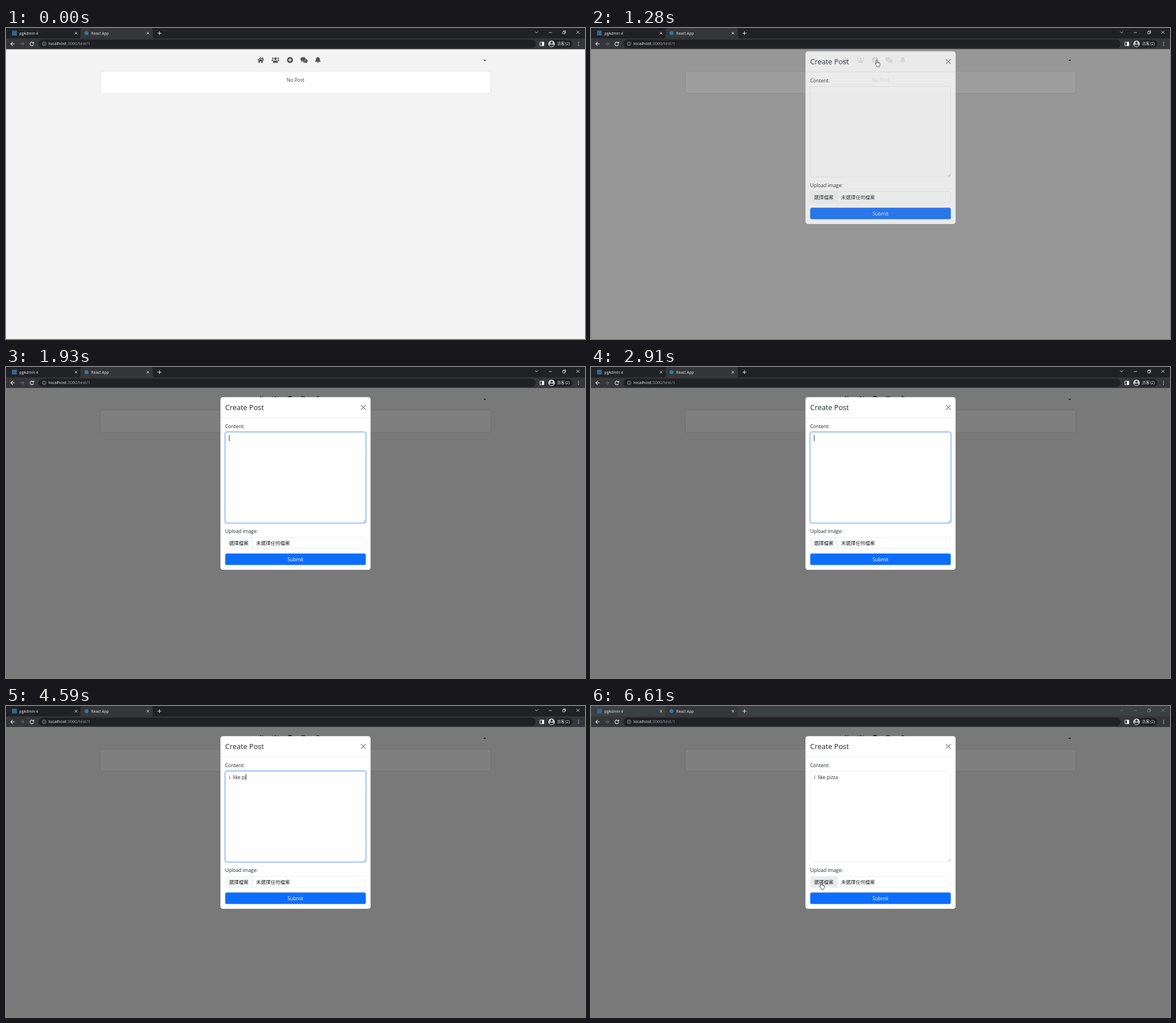
Write an HTML page that moves like this. It is 1021 px wide and 549 px high and loops after 8000 ms.

```html
<!DOCTYPE html>
<html lang="en">
<head>
<meta charset="utf-8">
<title>Create Post</title>
<style>
  html, body { margin: 0; width: 100%; height: 100%; overflow: hidden; background: #f3f3f3; }
  svg { display: block; width: 100%; height: 100%; }
  text { font: 8.51px "Open Sans", "Noto Sans", "Noto Sans CJK TC", "Noto Sans CJK JP", sans-serif; fill: #212529; white-space: pre; }
  .tab { font-size: 6.65px; fill: #e8eaed; }
  .url { font-size: 7.5px; fill: #9aa0a6; }
  .title { font-size: 12.76px; }
  .mid { text-anchor: middle; }
  .line { fill: none; stroke: #e8eaed; stroke-width: 1; }
  .field { fill: #fff; stroke: #dee2e6; stroke-width: .6; }
  .ring { fill: none; stroke: #0d6efd; stroke-opacity: .27; stroke-width: 2.2; }
  .edge { fill: none; stroke: #86b7fe; stroke-width: .7; }
  .cursor { fill: #fff; stroke: #222; stroke-width: .75; stroke-linejoin: round; }
</style>
</head>
<body>
<svg viewBox="0 0 1021 549">
  <!-- page -->
  <rect width="1021" height="549" fill="#f3f3f3"/>
  <g fill="#545454">
    <path d="M443.4 57.1L449 52.3l5.6 4.8" fill="none" stroke="#545454" stroke-width="1.4"/>
    <path d="M452 51.8h1.6v4.6l-1.6-1.4zM445.1 57.5l3.9-3.3 3.9 3.3v4.1h-2.8v-2.7h-2.2v2.7h-2.8z"/>
    <circle cx="475.2" cy="54" r="2.3"/>
    <circle cx="470.4" cy="53.7" r="1.4"/>
    <circle cx="480" cy="53.7" r="1.4"/>
    <path d="M471 61.4v-1.3q0-2.9 2.9-2.9h2.6q2.9 0 2.9 2.9v1.3zM468.3 58.1v-.7q0-1.5 1.5-1.5h1.3l1 .7-1.2 1.5zM482.1 58.1v-.7q0-1.5-1.5-1.5h-1.3l-1 .7 1.2 1.5z"/>
    <circle id="plus" cx="500.8" cy="56.5" r="5.4"/>
    <path d="M500.8 53.4v6.2M497.7 56.5h6.2" stroke="#f3f3f3" stroke-width="1.5"/>
    <path d="M529.8 60.2q.5 1.2 1.7 1.9-2 0-3.4-1z"/>
    <ellipse cx="527.4" cy="57.9" rx="4.5" ry="3.4"/>
    <ellipse cx="523.8" cy="55" rx="4.5" ry="3.4" stroke="#f3f3f3" stroke-width="1.2" paint-order="stroke"/>
    <path d="M520.9 57.3q-.4 1.2-1.5 2 2 0 3.4-1.1z"/>
    <path d="M549.9 51q.7 0 .7.8 2.9.6 2.9 3.8 0 2.3 1.2 3.3v.9h-9.6v-.9q1.2-1 1.2-3.3 0-3.2 2.9-3.8 0-.8.7-.8zM548.5 60.6h2.8q-.2 1.4-1.4 1.4t-1.4-1.4z"/>
  </g>
  <path d="M841.9 56h4.8l-2.4 2.4z" fill="#333"/>
  <rect x="166.3" y="76.3" width="688.5" height="38.8" rx="3" fill="#fff" stroke="#d3d3d3" stroke-width=".6"/>
  <text class="mid" x="510.5" y="94.6" style="fill:#3c4043">No Post</text>
  <rect id="shade" y="37.5" width="1021" height="511.5"/>

  <!-- browser frame -->
  <rect id="strip" width="1021" height="19"/>
  <path d="M127 19q4.3 0 4.3-4.3V4.3Q131.300 0 135.600 0h119q4.300 0 4.300 4.300v10.400q0 4.300 4.300 4.300z" fill="#35363a"/>
  <rect y="18.300" width="1021" height="19.200" fill="#35363a"/>
  <rect x="10.500" y="4.700" width="8.600" height="8.600" fill="#326690"/>
  <text class="tab" x="23.400" y="11.700">pgAdmin 4</text>
  <circle cx="142" cy="9" r="3.500" fill="#2f7d92"/>
  <text class="tab" x="150.300" y="11.700">React App</text>
  <path class="line" d="M121.400 7l4.200 4.200m0-4.200l-4.200 4.200M248.200 7l4.200 4.200m0-4.200l-4.200 4.200M267.300 9.100h6.600m-3.300-3.300v6.600"/>
  <path id="controls" class="line" style="stroke-width:.8" d="M932.800 6.200l2.700 2.700 2.700-2.700M957.200 8h5.500M981.700 6.400h3.900v3.900h-3.900zM983 6.200V5h3.900v4h-1.200M1006 4.900l5.200 5.200m0-5.200l-5.200 5.200"/>
  <path class="line" style="stroke-width:1.100" d="M15.300 28H8.500m3.300-3.300L8.500 28l3.300 3.300M48.300 26.400a3.200 3.200 0 1 0 .4 2.500M48.900 24.300v2.500h-2.600"/>
  <path class="line" style="stroke:#74777b" d="M25 28h6.800m-3.300-3.300l3.300 3.300-3.300 3.300"/>
  <rect x="57" y="20.500" width="877" height="14.800" rx="7.400" fill="#202124"/>
  <circle class="line" cx="67.200" cy="28" r="3.200" style="stroke:#b5b8bc;stroke-width:.7"/>
  <path class="line" d="M67.200 27.400v2.400m0-3.900v.8" style="stroke:#b5b8bc;stroke-width:.8"/>
  <text class="url" x="75" y="30.200"><tspan fill="#e8eaed">localhost</tspan>:3000/test/1</text>
  <path class="line" d="M941.500 25h6.800v6.200h-6.800z"/>
  <path d="M945 24.800h3.500v6.600H945z" fill="#fff"/>
  <rect x="955" y="20.900" width="44" height="13.800" rx="6.900" fill="#202124"/>
  <circle cx="962" cy="27.800" r="5.900" fill="#c3c6ca"/>
  <circle cx="962" cy="26" r="1.900" fill="#303134"/>
  <path d="M958.200 31.300q0-2.400 3.800-2.400t3.800 2.400q-3.800 2.600-7.600 0z" fill="#303134"/>
  <text class="tab" x="972" y="30.200" style="font-size:6.400px">訪客 (2)</text>
  <g fill="#e8eaed"><circle cx="1009.500" cy="25.300" r=".8"/><circle cx="1009.500" cy="28" r=".8"/><circle cx="1009.500" cy="30.700" r=".8"/></g>

  <!-- dialog -->
  <g id="modal">
    <rect x="378.200" y="53.300" width="264.700" height="304.600" rx="4.200" fill="#fff"/>
    <path d="M378.200 89.700h264.700" stroke="#dee2e6" stroke-width=".7"/>
    <text class="title" x="386.500" y="76">Create Post</text>
    <path d="M626.200 67.300l7.900 7.900m0-7.900l-7.900 7.900" stroke="#777" stroke-width="1.200" stroke-linecap="round"/>
    <text x="386.500" y="107.900">Content:</text>
    <rect class="field" x="386.800" y="115.200" width="247.500" height="159.800" rx="3.200"/>
    <path d="M629.800 273.800l3.800-3.800m-1.800 3.800l1.800-1.800" stroke="#777" stroke-width=".6"/>
    <g id="areaFocus">
      <rect class="ring" x="385.800" y="114.200" width="249.500" height="161.800" rx="4.200"/>
      <rect class="edge" x="386.800" y="115.200" width="247.500" height="159.800" rx="3.200"/>
    </g>
    <text id="typed" x="393.400" y="128.800"></text>
    <rect id="caret" y="120.300" width=".9" height="10.600" fill="#222"/>
    <text x="386.500" y="292.900">Upload image:</text>
    <rect class="field" x="386.800" y="300.600" width="247.500" height="20" rx="3.200"/>
    <path id="pick" d="M434.300 300.900H390q-2.900 0-2.900 2.900v13.600q0 2.900 2.900 2.900h44.300z"/>
    <path d="M434.300 300.600v20" stroke="#dee2e6" stroke-width=".6"/>
    <text x="393.400" y="313.700">選擇檔案</text>
    <text x="441" y="313.700">未選擇任何檔案</text>
    <g id="fileFocus">
      <rect class="ring" x="385.800" y="299.600" width="249.500" height="22" rx="4.200"/>
      <rect class="edge" x="386.800" y="300.600" width="247.500" height="20" rx="3.200"/>
    </g>
    <rect x="386.500" y="329.300" width="248" height="20.300" rx="3.200" fill="#0d6efd"/>
    <text class="mid" x="510.500" y="342.500" style="fill:#fff">Submit</text>
  </g>

  <path id="arrow" class="cursor" d="M0 0v8.600l2-1.900 1.300 3 1.400-.6-1.300-2.900h2.700z"/>
  <g id="hand" class="cursor">
    <path d="M-1 1a1 1 0 0 1 2 0v3.300l.3-.1c.7-.1 1.300.1 1.400.6.7-.2 1.300 0 1.400.7.8-.2 1.400.2 1.400 1v2c0 1.200-.6 1.900-.8 2.900v.9H0v-.9c-1-1.200-1.800-2.600-2.600-3.700-.8-1.200.4-1.900 1.200-1.100l.4.500z"/>
    <path d="M1 4.300v2.200m1.700-1.700v1.900m1.400-1.200v1.500" fill="none" stroke-width=".5"/>
  </g>
</svg>
<script>
const LOOP = 8000, TICK = 80;
const MESSAGE = "i  like pizza";
const KEYS = [2990, 3150, 3310, 3470, 3710, 3870, 3960, 4190, 4350, 4590, 4830, 4990, 5230];
// start, vertical offset, dialog opacity, backdrop opacity
const OPENING = [
  [0, -26.6, 0, 0],
  [1200, -24.4, .12, .045],
  [1280, -12, .8, .38],
  [1360, -4.200, 1, .495],
  [1440, -.9, 1, .5],
  [1520, 0, 1, .5]
];

const ui = {};
document.querySelectorAll("[id]").forEach(el => ui[el.id] = el);

const clamp = v => Math.min(1, Math.max(0, v));
const within = (t, a, b) => t >= a && t < b;
const show = (el, on) => el.setAttribute("visibility", on ? "visible" : "hidden");
const set = (el, name, value) => el.setAttribute(name, value);
const fade = (t, start) => t < start ? 0 : clamp((Math.floor((t - start) / TICK) + 1) / 2);
const smooth = p => p * p * (3 - 2 * p);

function pointer(t) {
  if (within(t, 170, 1360)) {
    const p = smooth(clamp(Math.floor((t - 170) / 79) / 10));
    const y = 381 - 325 * p;
    return { x: 530 - 26 * p, y, kind: y < 62 ? "hand" : "arrow" };
  }
  if (within(t, 1360, 1440)) return { x: 506, y: 77.700, kind: "arrow" };
  if (within(t, 1440, 1520)) return { x: 508, y: 102, kind: "arrow" };
  if (within(t, 5890, 5970)) return { x: 410, y: 286, kind: "arrow" };
  if (t >= 5970) return { x: 406, y: 311.200, kind: "hand" };
  return null;
}

function render(t) {
  const [, dy, alpha, dim] = OPENING.findLast(s => t >= s[0]);
  set(ui.modal, "transform", `translate(0 ${dy})`);
  set(ui.modal, "opacity", alpha);
  set(ui.shade, "opacity", dim);

  const inactive = t >= 6450;
  set(ui.strip, "fill", inactive ? "#3c4043" : "#202124");
  ui.controls.style.stroke = inactive ? "#8b8e92" : "#e8eaed";
  set(ui.plus, "fill", t >= 880 ? "#303030" : "#545454");

  set(ui.areaFocus, "opacity", fade(t, 1850) - fade(t, 6130));
  set(ui.fileFocus, "opacity", fade(t, 6130) - fade(t, 6450));
  set(ui.pick, "fill", ["#f8f9fa", "#f1f3f5", "#e9ecef"][fade(t, 5970) * 2]);

  const text = MESSAGE.slice(0, KEYS.filter(k => t >= k).length);
  if (ui.typed.textContent !== text) ui.typed.textContent = text;
  set(ui.caret, "x", 393.200 + (text ? ui.typed.getComputedTextLength() : 0));
  show(ui.caret, within(t, 1850, 2350) || within(t, 2910, 5810));

  const p = pointer(t);
  for (const kind of ["arrow", "hand"]) {
    show(ui[kind], p && p.kind === kind);
    if (p) set(ui[kind], "transform", `translate(${p.x} ${p.y})`);
  }
}

const begin = performance.now();
function frame() {
  render((performance.now() - begin) % LOOP);
  requestAnimationFrame(frame);
}
frame();
</script>
</body>
</html>
```
